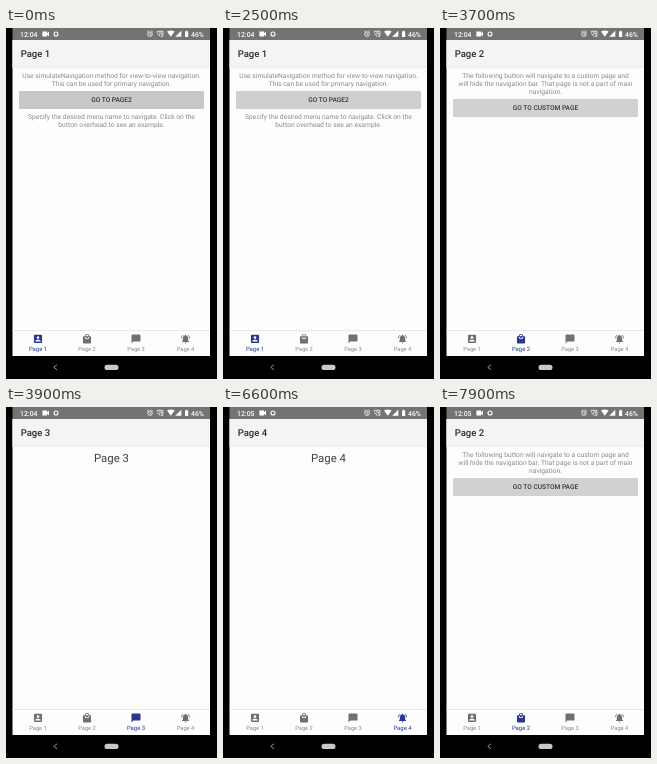
These frames come from a looping animation (211 by 351 pixels, 8 s). An HTML page:

```html
<!DOCTYPE html>
<html lang="en">
<head>
<meta charset="utf-8">
<title>Page navigation</title>
<style>
  html, body { margin: 0; width: 100%; height: 100%; overflow: hidden; background: #000; }
  svg { display: block; width: 100vw; height: 100vh; }
  text { font-family: Roboto, sans-serif; text-rendering: geometricPrecision; white-space: pre; }
</style>
</head>
<body>
<svg id="stage" viewBox="0 0 211 351"></svg>
<script>
const LOOP = 8000;
const ACTIVE = '#27378f', IDLE_ICON = '#707070', IDLE_LABEL = '#8c8c8c';
const TAB_X = [32, 81, 130, 179.5];

const text = (s, x, y, size, fill, anchor = 'middle', weight = 400) =>
  `<text x="${x}" y="${y}" font-size="${size}" fill="${fill}" text-anchor="${anchor}" font-weight="${weight}">${s}</text>`;
const rect = (x, y, w, h, fill, rx = 0) =>
  `<rect x="${x}" y="${y}" width="${w}" height="${h}" rx="${rx}" fill="${fill}"/>`;
const lines = (rows, y) =>
  rows.map((s, i) => text(s, 105.5, y + i * 8, 6.72, '#8b8b8b')).join('');
const button = (label, y) =>
  rect(13, y, 185, 18, '#d1d1d1', 1).replace('<rect', '<rect class="button"') +
  text(label, 105.5, y + 11.4, 6.6, '#343434', 'middle', 500);
const heading = s => text(s, 105.5, 55.3, 11.4, '#404040');

// Tab icons on a 24 unit grid
const icons = [
  `<path fill-rule="evenodd" d="M5 3H19Q21 3 21 5V19Q21 21 19 21H5Q3 21 3 19V5Q3 3 5 3Z
    M15 9a3 3 0 1 0-6 0a3 3 0 1 0 6 0Z M6 18V17C6 15 10 13.9 12 13.9S18 15 18 17V18Z"/>`,
  `<path fill-rule="evenodd" d="M7 6a5 5 0 0 1 10 0H19Q21 6 21 8V20Q21 22 19 22H5Q3 22 3 20V8Q3 6 5 6Z
    M9 6H15a3 3 0 0 0-6 0Z M7 8a5 5 0 0 0 10 0H15a3 3 0 0 1-6 0Z"/>`,
  `<path d="M4 2H20Q22 2 22 4V16Q22 18 20 18H6L2 22V4Q2 2 4 2Z"/>`,
  `<path d="M10.5 4.7V4a1.5 1.5 0 0 1 3 0V4.7Q18 6 18 11V16L20 18V19H4V18L6 16V11Q6 6 10.5 4.7Z
    M10 20H14a2 2 0 0 1-4 0Z"/>
   <path d="M3 10.5Q3.3 6 6.9 3.4M21 10.5Q20.7 6 17.1 3.4" fill="none" stroke="currentColor" stroke-width="2"/>`
];

const bodies = [
  lines(['Use simulateNavigation method for view-to-view navigation.',
         'This can be used for primary navigation.'], 50.3) +
  button('GO TO PAGE2', 63) +
  lines(['Specify the desired menu name to navigate. Click on the',
         'button overhead to see an example.'], 90.8),
  lines(['The following button will navigate to a custom page and',
         'will hide the navigation bar. That page is not a part of main',
         'navigation.'], 50.3) +
  button('GO TO CUSTOM PAGE', 71),
  heading('Page 3'),
  heading('Page 4')
];

const statusBar =
  rect(6.5, 0, 197.5, 12, '#737373') +
  text('', 14, 8.5, 6.9, '#fff', 'start', 500).replace('<text', '<text id="clock"') +
  text('46%', 185, 8.5, 6.9, '#fff', 'start', 500) +
  `<g fill="#fff">
    <path d="M36.4 3.5h4.6v1.7l2-1.6v4.8l-2-1.6v1.7h-4.6z"/>
    <path d="M161 3.6Q164.8 1.6 168.6 3.6L164.8 8.8Z"/>
    <path d="M175.3 2.8V8.8H169.2Z"/>
    <path d="M179 3.5h.9v-.8h1.4v.8h.9v5.4h-3.2z"/>
  </g>
  <g fill="none" stroke="#fff" stroke-width=".8">
    <circle cx="50" cy="6" r="2" stroke-width="1.1"/>
    <circle cx="144" cy="6.1" r="2.3"/>
    <path d="M144 4.7V6.3l1 .7M141.2 4l1.4-1.2M146.8 4l-1.4-1.2"/>
    <path d="M151.3 4.8V3.3h5.6v5h-2.3M151.3 6a2.4 2.4 0 0 1 2.4 2.4M153 5h2.5v1.8"/>
  </g>`;

const tabs = TAB_X.map((x, i) =>
  `<g class="tab"><g class="icon" fill="currentColor" transform="translate(${x - 5.4} 305.5) scale(.45)">${icons[i]}</g>` +
  text('Page ' + (i + 1), x, 322.6, 5.75, 'currentColor').replace('<text', '<text class="label"') + '</g>'
).join('');

const stage = document.getElementById('stage');
stage.innerHTML =
  rect(0, 0, 211, 351, '#000') +
  rect(6.5, 12, 197.5, 316, '#fdfdfd') +
  rect(6.5, 12, 197.5, 27, '#f3f4f3') +
  rect(6.5, 38.6, 197.5, .8, '#e0e0e0') +
  rect(6.5, 39.4, 197.5, .8, '#f3f3f3') +
  statusBar +
  bodies.map((b, i) => `<g class="page">${
    text('Page ' + (i + 1), 14.7, 28.8, 9.5, '#2c2c2c', 'start', 500)}${b}</g>`).join('') +
  rect(6.5, 302, 197.5, .8, '#e4e4e4') + tabs +
  '<path d="M51 336.8L47.8 339.3L51 341.8" fill="none" stroke="#a8a8a8" stroke-width=".9"/>' +
  rect(98.5, 336.7, 14, 5.4, '#c9c9c9', 2.7);

const all = s => [...stage.querySelectorAll(s)];
const pages = all('.page'), tabEls = all('.tab'), clock = stage.querySelector('#clock');
const icon = all('.icon'), label = all('.label'), press = all('.button')[0];
const clamp = v => Math.max(0, Math.min(1, v));

function draw(t) {
  const shown = t < 2900 ? 0 : t < 3900 ? 1 : t < 5000 ? 2 : 3;
  const fade = clamp((Math.floor(t / 100) * 100 - 6600) / 300);
  const selected = t < 6700 ? shown : 1;
  const opacity = i => i === shown ? 1 - fade : i === 1 ? fade : 0;

  pages.forEach((p, i) => p.setAttribute('opacity', opacity(i)));
  tabEls.forEach((_, i) => {
    const on = i === selected;
    icon[i].setAttribute('color', on ? ACTIVE : IDLE_ICON);
    label[i].setAttribute('color', on ? ACTIVE : IDLE_LABEL);
    label[i].setAttribute('font-size', on ? 5.95 : 5.75);
  });
  const grey = Math.round(200 + 7 * clamp(t / 500));
  press.setAttribute('fill', `rgb(${grey},${grey},${grey})`);
  clock.textContent = t < 6600 ? '12:04' : '12:05';
}

const start = performance.now();
function tick() {
  draw((performance.now() - start) % LOOP);
  requestAnimationFrame(tick);
}
tick();
</script>
</body>
</html>
```
